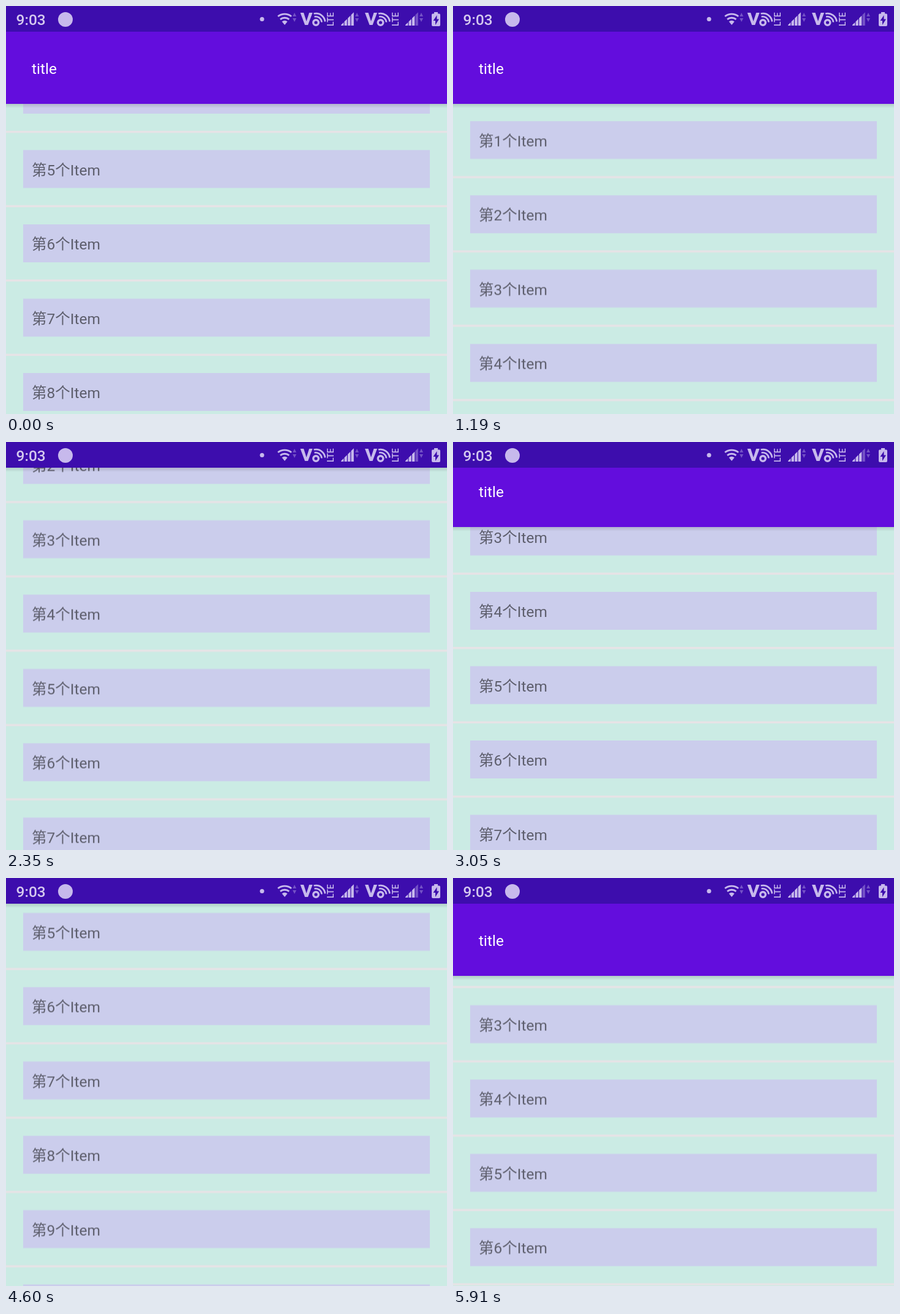
An HTML page that plays this animation: 720 by 667 pixels, repeating every 6040 ms.

```html
<!DOCTYPE html>
<html lang="zh-CN">
<head>
<meta charset="utf-8">
<title>Collapsing title</title>
<style>
  html, body { margin: 0; width: 100%; height: 100%; overflow: hidden; background: #cbebe4; }
  svg { display: block; width: 720px; height: 667px; }
  text { font: 24.5px Roboto, "Noto Sans CJK SC", "Noto Sans CJK", sans-serif; }
  .label { fill: rgba(0, 0, 0, .54); }
  .icon { fill: #c7b9ec; }
  .arc { fill: none; stroke: #c7b9ec; }
  .dim { fill: #7452c6; }
  .clock { fill: #d5caef; font-weight: 500; }
  .lte { font-size: 14px; font-weight: 500; }
</style>
</head>
<body>
<svg viewBox="0 0 720 667">
  <defs>
    <linearGradient id="shade" x2="0" y2="1">
      <stop stop-color="#000" stop-opacity=".13"/>
      <stop offset="1" stop-color="#000" stop-opacity="0"/>
    </linearGradient>
    <g id="arrows" class="dim"><path d="M0 11l3 6h-6zM0 26l3-6h-6z"/></g>
    <g id="volte">
      <path class="icon" d="M0 11h5.5l4.5 14 4.5-14h5.5l-7.5 20h-5z"/>
      <circle class="arc" cx="25.5" cy="27" r="4.3" stroke-width="3.4"/>
      <path class="arc" stroke-width="2.7" d="M23 17.5a10 10 0 0 1 12 9M22 12.5a15 15 0 0 1 18.5 13"/>
      <text class="icon lte" transform="translate(54.5 33) rotate(-90)">LTE</text>
    </g>
  </defs>
  <rect width="720" height="667" fill="#cbebe4"/>
  <g id="list"></g>
  <g id="header">
    <rect y="-118" width="720" height="118" fill="#630ddd"/>
    <rect width="720" height="7" fill="url(#shade)"/>
    <text x="42" y="-49.5" fill="#fff">title</text>
  </g>
  <g id="status">
    <rect width="720" height="42" fill="#3d0dad"/>
    <text class="clock" x="16.5" y="31">9:03</text>
    <circle class="icon" cx="97" cy="22" r="12"/>
    <circle class="icon" cx="418" cy="21.5" r="3.5"/>
    <path class="icon" d="M455 31l-4.5-5.6a7 7 0 0 1 9 0z"/>
    <path class="arc" stroke-width="2.8" d="M447.8 21.8a11.5 11.5 0 0 1 14.4 0M444 17a17.5 17.5 0 0 1 22 0"/>
    <use href="#arrows" x="471"/>
    <use href="#volte" x="480.5"/>
    <use href="#arrows" x="573"/>
    <use href="#volte" x="586"/>
    <use href="#arrows" x="678"/>
    <path class="icon" d="M699 10h6v2.5h2q2 0 2 2v16.5q0 2-2 2h-10q-2 0-2-2v-16.500q0-2 2-2h2z"/>
    <path fill="#3d0dad" d="M703.500 15v6.500h3.500l-6 9.500v-7h-3.500z"/>
  </g>
</svg>
<script>
const LOOP = 6040, PITCH = 121.5, BAR = 42, OPEN = 160;
const $ = id => document.getElementById(id);

function add(parent, tag, attrs, text = '') {
  const el = document.createElementNS('http://www.w3.org/2000/svg', tag);
  for (const key in attrs) el.setAttribute(key, attrs[key]);
  el.textContent = text;
  parent.append(el);
}

for (let i = 0; i < 12; i++) {
  const y = i * PITCH;
  add($('list'), 'rect', { x: 28, y, width: 664, height: 62, fill: '#cbcdec' });
  add($('list'), 'rect', { x: 0, y: y + 90, width: 720, height: 3.5, fill: '#e6e3e6' });
  add($('list'), 'text', { x: 42, y: y + 41, class: 'label' }, `第${i + 1}个Item`);
}

function signal(x, level) {
  for (let i = 0; i < 4; i++) {
    const left = i * 5.5, right = left + 4.3;
    add($('status'), 'path', {
      class: i < level ? 'icon' : 'dim',
      d: `M${x + left} 32V${31 - left}L${x + right} ${31 - right}V32z`
    });
  }
}
signal(547, 4);
signal(652, 3);

// Top of the first box as the finger drags it: [ms, y]
const drag = [
  [0, -250.5], [1190, 188], [1600, 188], [2350, -115], [2700, -216.5], [3050, -119.5],
  [3670, 19], [3800, 30], [4600, -429], [4860, -482], [5910, -35], [6040, -15]
];

const rate = i => (drag[i + 1][1] - drag[i][1]) / (drag[i + 1][0] - drag[i][0]);

function slope(i) {
  if (i === 0 || i === drag.length - 1) return 0;
  const a = rate(i - 1), b = rate(i);
  return a * b > 0 ? 2 * a * b / (a + b) : 0;
}

// Monotone cubic through the drag points
function dragAt(t) {
  const i = Math.max(0, drag.findIndex(p => p[0] >= t) - 1);
  const [t0, y0] = drag[i], [t1, y1] = drag[i + 1];
  const d = t1 - t0, u = (t - t0) / d, v = 1 - u;
  return y0 * v * v * (1 + 2 * u) + y1 * u * u * (3 - 2 * u)
    + d * u * v * (slope(i) * v - slope(i + 1) * u);
}

// Screen refreshes: [gap in ms, count]
const gaps = [
  [200, 1], [130, 2], [200, 1], [130, 1], [200, 1], [130, 1], [70, 1], [460, 1],
  [70, 24], [130, 1], [70, 3], [130, 1], [70, 2], [130, 1], [70, 2], [130, 8],
  [200, 1], [130, 2], [200, 1]
];
const times = [0];
for (const [gap, count] of gaps)
  for (let i = 0; i < count; i++) times.push(times.at(-1) + gap);

// The header takes up each movement first, within its limits
let edge = OPEN, last = dragAt(0);
const poses = times.map(t => {
  const y = dragAt(t);
  edge = Math.min(OPEN, Math.max(BAR, edge + y - last));
  last = y;
  return { t, y, edge };
});

function play(id, key) {
  const frames = poses.map(p => ({
    offset: p.t / LOOP, easing: 'step-end', transform: `translateY(${p[key].toFixed(1)}px)`
  }));
  frames.push({ ...frames.at(-1), offset: 1 });
  $(id).animate(frames, { duration: LOOP, iterations: Infinity });
}
play('list', 'y');
play('header', 'edge');
</script>
</body>
</html>
```
